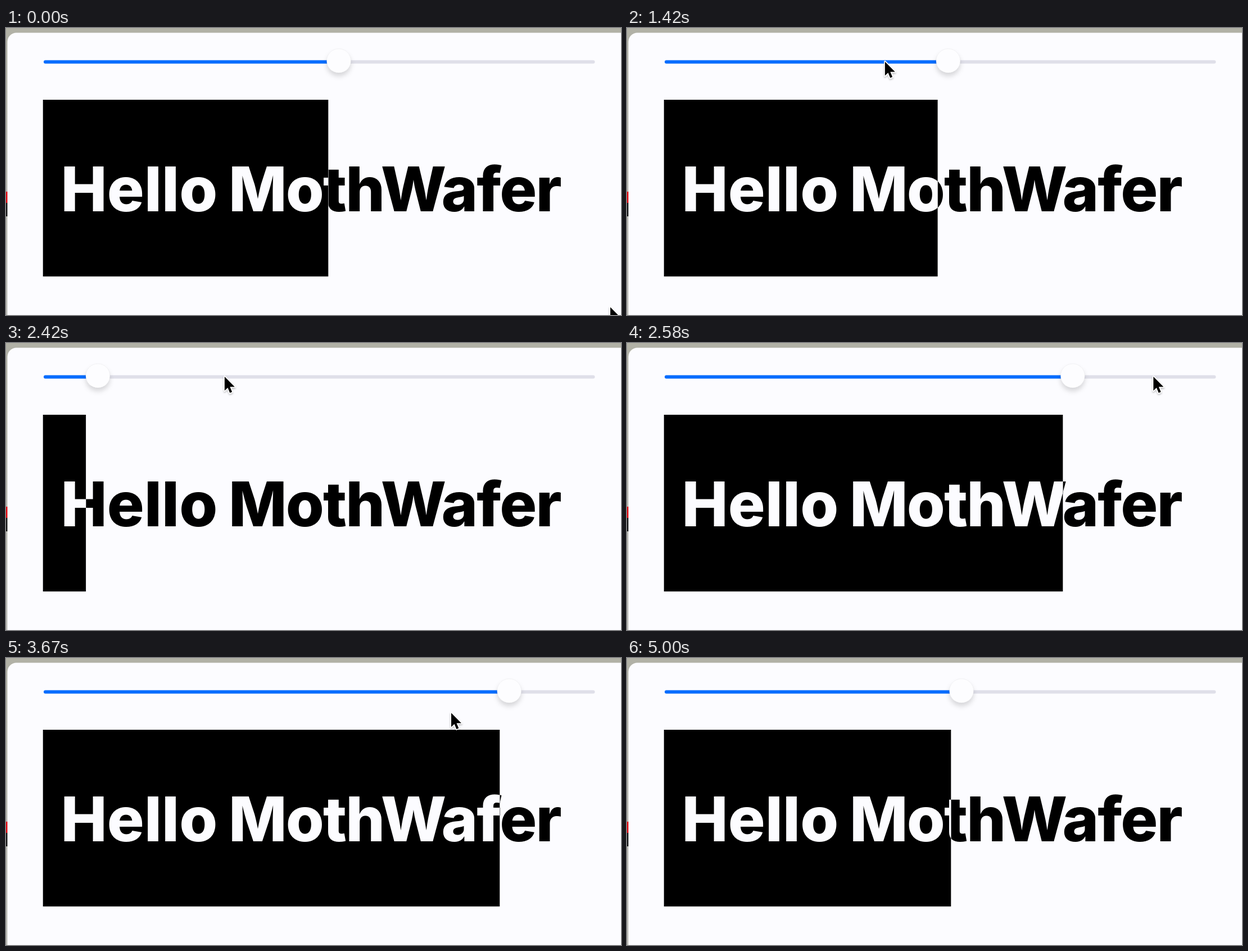
An HTML page for the animation above (5.91 s loop, 1094 by 512 pixels).

```html
<!DOCTYPE html>
<html lang="en">
<head>
<meta charset="utf-8">
<title>Slider reveal</title>
<style>
  html, body { margin: 0; width: 100%; height: 100%; overflow: hidden; background: #b3b3a8; }
  svg { display: block; width: 100vw; height: 100vh; }
  text { font: 800 110px Inter, "Liberation Sans", sans-serif; }
  .name { letter-spacing: -.018em; }
</style>
</head>
<body>
<svg viewBox="0 0 1094 512">
  <defs>
    <linearGradient id="desk" x2="0" y2="1">
      <stop offset="0" stop-color="#b1b1a6"/>
      <stop offset="1" stop-color="#bdbdb8"/>
    </linearGradient>
    <filter id="soft" x="-50%" y="-50%" width="200%" height="200%">
      <feDropShadow dx="0" dy="6" stdDeviation="4.5" flood-opacity=".15"/>
    </filter>
    <filter id="lift" x="-50%" y="-50%" width="200%" height="200%">
      <feDropShadow dx="0" dy="2" stdDeviation="1.5" flood-opacity=".25"/>
    </filter>
    <clipPath id="reveal"><rect class="bar" x="65.5" y="128" height="315.5"/></clipPath>
    <g id="label">
      <text x="97.5" y="326.5">Hello</text>
      <text class="name" x="396" y="326.5">MothWafer</text>
    </g>
  </defs>

  <rect width="1094" height="512" fill="url(#desk)"/>
  <rect y="292" width="4" height="20" fill="#e00010"/>
  <rect y="312" width="4" height="24" fill="#1a1a1a"/>
  <rect x="2.5" y="8.5" width="1130" height="540" rx="16" fill="#fcfcff"/>

  <rect x="67" y="57.5" width="980.5" height="6" rx="3" fill="#dfdfe9"/>
  <rect id="fill" x="67" y="57.5" height="6" rx="3" fill="#066dff"/>
  <circle id="thumb" cy="58.5" r="21.5" fill="#fdfdff" stroke="#000" stroke-opacity=".04" filter="url(#soft)"/>

  <use href="#label"/>
  <g clip-path="url(#reveal)">
    <rect class="bar" x="65.5" y="128" height="315.5"/>
    <use href="#label" fill="#fcfcff"/>
  </g>

  <path id="cursor" d="M0 0V25L5.6 19.8 9.4 29 13.3 27.3 9.5 18.3H18Z" stroke="#fff" stroke-width="3.4"
    stroke-linejoin="round" paint-order="stroke" filter="url(#lift)"/>
</svg>
<script>
  const LOOP = 5910, FPS = 12;
  const LAG = 0.85, GRAB = 16, DROP = 54; // in ticks
  const MIN_X = 87.5, MAX_X = 1024.5;

  const out = p => 1 - (1 - p) ** 2;
  const inOut = p => p < 0.5 ? 2 * p * p : 1 - 2 * (1 - p) ** 2;
  const clamp = (v, lo, hi) => Math.min(hi, Math.max(lo, v));

  // Pointer strokes, times in ticks
  const home = { x: 1075, y: 498 };
  const strokes = [
    { from: 0, to: 8, x: 544, y: 98, ease: inOut },
    { from: 8, to: 12, x: 587, y: 60, ease: inOut },
    { from: GRAB, to: 22.3, x: 148.5, y: 60, ease: out },
    { from: 22.3, to: 25, x: 62, y: 60, ease: inOut },
    { from: 27.14, to: 31.5, x: 960, y: 60, ease: inOut },
    { from: 31.5, to: 36, x: 1009, y: 96, ease: out },
    { from: 37, to: 40, x: 1022, y: 98, ease: inOut },
    { from: 40.5, to: 47.5, x: 562, y: 98, ease: inOut },
    { from: 50, to: 53, x: 590, y: 96, ease: inOut },
    { from: 56, to: 60, x: 1030, y: 540, ease: inOut }
  ];

  const $ = id => document.getElementById(id);
  const bars = document.querySelectorAll(".bar");

  function pointer(tick) {
    let { x, y } = home;
    for (const s of strokes) {
      const p = s.ease(clamp((tick - s.from) / (s.to - s.from), 0, 1));
      x += (s.x - x) * p;
      y += (s.y - y) * p;
    }
    return { x, y };
  }

  // The thumb trails the pointer while it is held
  function thumbX(tick) {
    return clamp(pointer(clamp(tick - LAG, GRAB, DROP)).x + 5, MIN_X, MAX_X);
  }

  function draw(ms) {
    // The picture holds between ticks
    const tick = Math.floor(ms % LOOP / 1000 * FPS + 0.06);
    const cx = thumbX(tick), { x, y } = pointer(tick);
    $("thumb").setAttribute("cx", cx);
    $("fill").setAttribute("width", cx - 67);
    bars.forEach(bar => bar.setAttribute("width", (cx - MIN_X) / 0.994 + 0.5));
    $("cursor").setAttribute("transform", `translate(${x} ${y})`);
  }

  const start = performance.now();
  function frame() {
    draw(performance.now() - start);
    requestAnimationFrame(frame);
  }
  frame();
</script>
</body>
</html>
```
